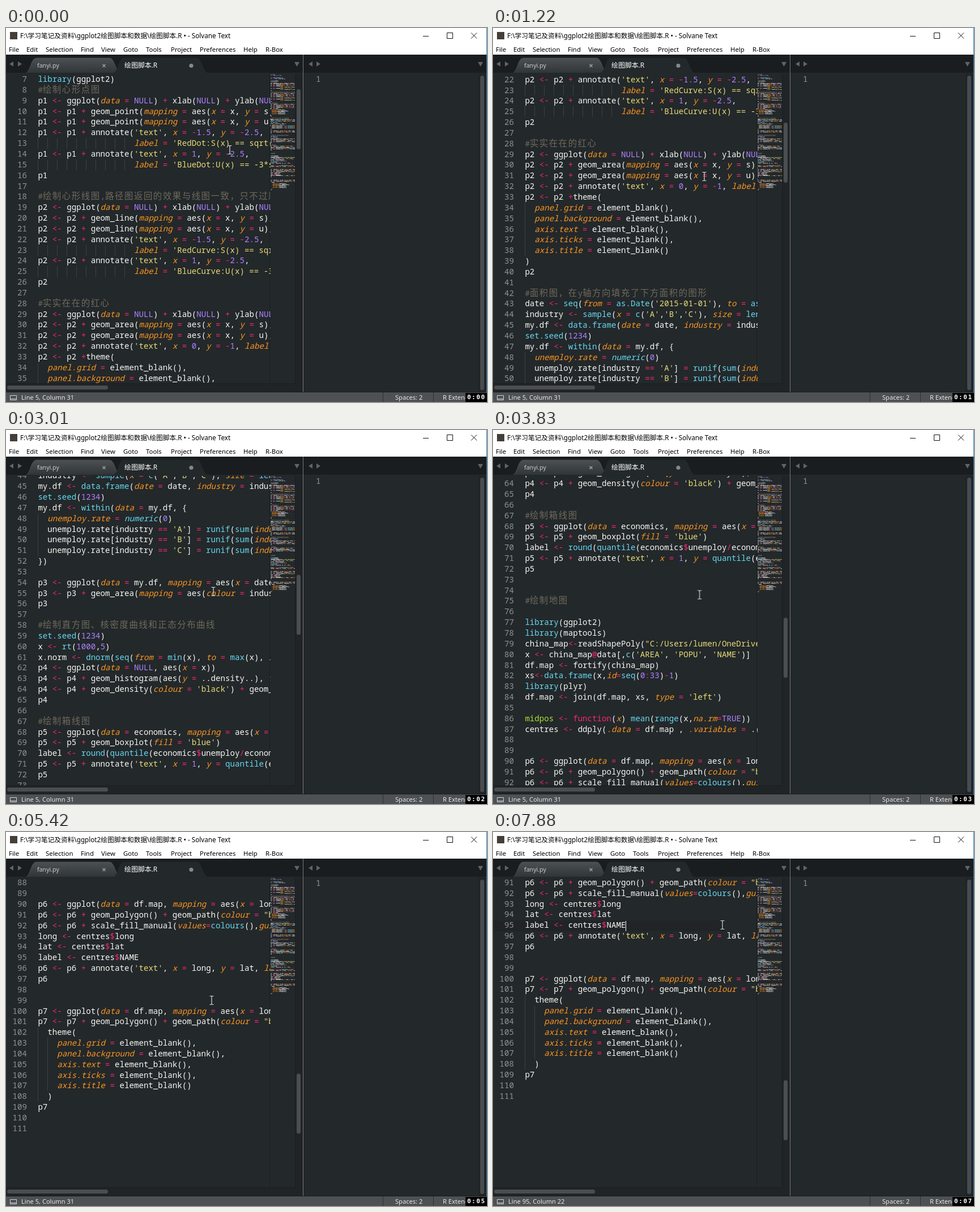
These frames come from a looping animation (849x660 px, 8000 ms). An HTML page:

```html
<!DOCTYPE html>
<html lang="zh">
<head>
<meta charset="utf-8">
<title>Editor</title>
<style>
@property --s { syntax: "<number>"; inherits: true; initial-value: 7; }
@property --t { syntax: "<integer>"; inherits: true; initial-value: 0; }

html, body { margin: 0; width: 849px; height: 660px; overflow: hidden; background: #23282b; }
body {
  position: relative;
  font: 11.4px "Noto Sans", "Noto Sans CJK SC", sans-serif;
  --row: 18.857px;
  animation: scroll 8s step-end infinite, tick 8s step-end infinite;
}
body > * { position: absolute; }
svg { left: 0; top: 0; overflow: visible; }

/* code */
#view { left: 0; top: 81px; width: 467px; height: 546px; overflow: hidden; }
#view .code { transform: translateY(calc((1 - var(--s)) * var(--row) + .6px)); }
.code, .num { font: 14.133px/18.857px "Noto Sans Mono", monospace; color: #f8f8f2; }
.row { position: relative; height: var(--row); padding-left: 56.4px; white-space: pre; }
.no { position: absolute; left: 0; width: 37px; text-align: right; }
.no, .num { color: #8f9391; }
.pad { background: repeating-linear-gradient(90deg, #3b4144 0 1px, transparent 1px 16.96px); display: inline-block; height: 100%; vertical-align: top; }
.com { color: #6e6a5b; }
.str { color: #e6db74; }
.arg { color: #fd971f; font-style: italic; }
.fun { color: #66d9ef; }
.typ { color: #66d9ef; font-style: italic; }
.def { color: #a6e22e; }
.op { color: #f92672; }
.val { color: #ae81ff; }
.cjk { font: 15.4px/1px "Noto Sans CJK SC", sans-serif; letter-spacing: 1.56px; }
#line { position: absolute; top: 75.4px; width: 408px; height: 19px; background: #202427; }
#caret { position: absolute; left: 234px; top: 76px; width: 1px; height: 18px; background: #f8f8f0; }
.num { left: 547px; top: 81px; }

/* minimap and scrollbar */
#map { left: 467px; top: 81px; width: 43px; height: 546px; overflow: hidden; }
#map .code { width: 430px; transform: scale(.1); transform-origin: 0 0; -webkit-text-stroke: 1.4px; }
#map .row { padding-left: 4px; }
#map .no { display: none; }
#thumb {
  left: 513px; top: 108px; width: 7px; height: 106px; border-radius: 4px; background: #4a4e50;
  transform: translateY(calc((var(--s) - 7) * 3.93px));
}

#clock { left: 811px; top: 644px; width: 38px; height: 16px; background: #000; color: #fff;
  font: bold 11px/16px "DejaVu Sans Mono", monospace; letter-spacing: 1.5px; text-indent: 3px; }
#clock::after { counter-reset: sec var(--t); content: "0:0" counter(sec); }

/* menu */
#hot { left: 451px; top: 28px; width: 44px; height: 18px; background: #cce8ff; border: 1px solid #99d1ff; }
#hot span { position: absolute; left: 6px; top: -1px; line-height: 20px; }
#menu {
  left: 451px; top: 47px; width: 245px; height: 315px; box-sizing: border-box; padding: 1.6px 0 0 33px;
  background: #f2f2f2; color: #6d6d6d; font-size: 11.6px; line-height: 20.7px; white-space: nowrap;
  box-shadow: 2px 2px 3px #0009;
}
#menu b { color: #000; font-weight: 400; }
#menu hr { margin: 2.65px 4px 2.65px -4px; border: 0; height: 1px; background: #d0d0d0; }

#mouse { animation: move 8s linear infinite; }

.show { opacity: 0; animation: 8s step-end infinite; }
#menu { animation-name: menu; }
#hot { animation-name: hot; }
#arrow { animation-name: arrow; }
#ring { animation-name: ring; }
.late { animation-name: late; }
.early { animation: early 8s step-end infinite; }
#beam { animation: beam 8s step-end infinite; }

@keyframes scroll {
  0% { --s: 7; }
  1.5% { --s: 7; animation-timing-function: steps(8, start); }
  15.2% { --s: 22; }
  17.12% { --s: 22; animation-timing-function: steps(4, start); }
  23.9% { --s: 31; }
  25.6% { --s: 31; animation-timing-function: steps(5, start); }
  33.7% { --s: 43; }
  37.6% { --s: 44.5; }
  38.85% { --s: 44.5; animation-timing-function: steps(7, start); }
  51.2% { --s: 67; }
  51.25% { --s: 68.5; }
  52.5% { --s: 70; }
  56% { --s: 73; }
  57.8% { --s: 76.36; }
  59.35% { --s: 76.36; animation-timing-function: steps(6, start); }
  69.4% { --s: 88; }
  69.5% { --s: 90; }
  71.2%, 100% { --s: 91; }
}
@keyframes tick {
  0% { --t: 0; }
  13.3% { --t: 1; }
  25.6% { --t: 2; }
  39% { --t: 3; }
  51.2% { --t: 4; }
  64.4% { --t: 5; }
  80% { --t: 6; }
  88.5%, 100% { --t: 7; }
}
@keyframes move {
  0%, 1.5% { transform: translate(395px, 215px); }
  15.2%, 17.1% { transform: translate(373px, 262px); }
  22.2%, 25.6% { transform: translate(370px, 272px); }
  37.6%, 38.8% { transform: translate(366px, 285px); }
  57.8%, 71.2% { transform: translate(363px, 297px); }
  77.5%, 85.2% { transform: translate(475px, 38px); }
  90.5% { transform: translate(374px, 185px); }
  96.6%, 100% { transform: translate(405px, 164px); }
}
@keyframes menu { 0% { opacity: 0; } 78.5% { opacity: .45; } 79.8% { opacity: 1; } 85.2%, 100% { opacity: 0; } }
@keyframes hot { 0% { opacity: 0; } 77.5% { opacity: 1; } 85.2%, 100% { opacity: 0; } }
@keyframes ring { 0% { opacity: 0; } 77.8% { opacity: 1; } 80.2%, 100% { opacity: 0; } }
@keyframes arrow { 0% { opacity: 0; } 77% { opacity: 1; } 85.6%, 100% { opacity: 0; } }
@keyframes beam { 0% { opacity: 1; } 77% { opacity: 0; } 85.6%, 100% { opacity: 1; } }
@keyframes late { 0% { opacity: 0; } 98.45%, 100% { opacity: 1; } }
@keyframes early { 0% { opacity: 1; } 98.45%, 100% { opacity: 0; } }
</style>
</head>
<body>
<svg width="849" height="660" viewBox="0 0 849 660">
  <defs>
    <linearGradient id="tab" x2="0" y2="1">
      <stop stop-color="#4c5052"/><stop offset="1" stop-color="#2f3437"/>
    </linearGradient>
  </defs>
  <rect width="849" height="47" fill="#fff"/>
  <rect x="7" y="7" width="13" height="13" fill="#443f3a"/>
  <text x="25" y="18" font-size="11.7">F:\学习笔记及资料\ggplot2绘图脚本和数据\绘图脚本.R • - Solvane Text</text>
  <path d="M736 14.5h10M778.5 8.5h10v10h-10zM821 8.5l10 10M831 8.5l-10 10" fill="none" stroke="#111"/>
  <g id="menus"></g>

  <rect y="47" width="849" height="33" fill="#1a1d1f"/>
  <path d="M34 80C44 78 43 53 54 53H182C193 53 192 78 204 80Z" fill="url(#tab)" stroke="#5d6163" stroke-width=".6"/>
  <path d="M188 80C199 78 198 52.5 208 52.5H336C347 52.5 346 78 358 80Z" fill="#23282b"/>
  <rect y="79" width="849" height="2" fill="#23282b"/>
  <text x="55" y="70" font-size="10.6" fill="#c9cbcc">fanyi.py</text>
  <path d="M170.5 64l5 5M175.5 64l-5 5" stroke="#a5a8a9" stroke-width="1.3"/>
  <text x="209" y="70" font-size="11.9" fill="#fff">绘图脚本.R</text>
  <circle cx="327" cy="66.5" r="3.6" fill="#85898b"/>
  <path d="M13 59v9l-7-4.5zM21 59v9l7-4.5zM509 60h9l-4.5 8zM541 59v9l-7-4.5zM548 59v9l7-4.5zM833 60h9l-4.5 8z" fill="#606466"/>

  <path d="M465.5 81V627M510.5 81V627M0 627.5H511" stroke="#1a1e20"/>
  <rect x="511" y="81" width="13" height="561" fill="#202427"/>
  <rect y="628" width="524" height="14" fill="#202427"/>
  <rect x="2" y="631" width="178" height="7" rx="3.5" fill="#4a4e50"/>
  <path d="M524.5 47V642" stroke="#75797b"/>
  <rect x="834" y="81" width="15" height="561" fill="#202427"/>
  <rect x="837" y="84" width="7" height="555" rx="3.5" fill="#484c4f"/>

  <rect y="643" width="849" height="17" fill="#4e5153"/>
  <path d="M0 642.5H849" stroke="#1a1d1f"/>
  <path d="M665.5 643V660M754.5 643V660" stroke="#2f3234"/>
  <path d="M7.5 648.5h11v8h-11zM8 654.5h10" fill="none" stroke="#d0d2d3"/>
  <g font-size="11.1" fill="#e6e7e8">
    <text class="early" x="27" y="656">Line 5, Column 31</text>
    <text class="show late" x="27" y="656">Line 95, Column 22</text>
    <text x="687" y="656">Spaces: 2</text>
    <text x="771" y="656">R Extended</text>
  </g>
  <path d="M848.5 0V644" stroke="#2a7fc4"/>
</svg>

<div id="view"><div id="line" class="show late"></div><div class="code"></div><div id="caret" class="show late"></div></div>
<div id="map"><div class="code"></div></div>
<div id="thumb"></div>
<div class="num">1</div>
<div id="clock"></div>
<div id="hot" class="show"><span>R-Box</span></div>
<div id="menu" class="show"></div>
<svg id="mouse" width="20" height="20">
  <path id="beam" d="M-3.5-7.5h2.5l1 1 1-1h2.5M-3.5 7.5h2.5l1-1 1 1h2.5M0-6.5v13" fill="none" stroke="#d9dbdc" stroke-width="1.2"/>
  <circle id="ring" class="show" r="9" fill="none" stroke="#222" stroke-width="1.3"/>
  <path id="arrow" class="show" d="M-1-1V13l3.2-3 2.2 5 2.2-1-2.2-4.8H9z" fill="#fff" stroke="#000" stroke-width=".9"/>
</svg>

<script>
const source = `#心形函数
x <- seq(-2, 2, 0.001)

s <- sqrt(1-(abs(x)-1)^2)
u <- -3*sqrt(1-sqrt(abs(x)/2))

library(ggplot2)
#绘制心形点图
p1 <- ggplot(data = NULL) + xlab(NULL) + ylab(NULL)
p1 <- p1 + geom_point(mapping = aes(x = x, y = s), colour = 'red')
p1 <- p1 + geom_point(mapping = aes(x = x, y = u), colour = 'blue')
p1 <- p1 + annotate('text', x = -1.5, y = -2.5,
                    label = 'RedDot:S(x) == sqrt(1-(abs(x)-1)^2)')
p1 <- p1 + annotate('text', x = 1, y = -2.5,
                    label = 'BlueDot:U(x) == -3*sqrt(1-sqrt(x))')
p1

#绘制心形线图,路径图返回的效果与线图一致，只不过顺序不同
p2 <- ggplot(data = NULL) + xlab(NULL) + ylab(NULL)
p2 <- p2 + geom_line(mapping = aes(x = x, y = s), colour = 'red')
p2 <- p2 + geom_line(mapping = aes(x = x, y = u), colour = 'blue')
p2 <- p2 + annotate('text', x = -1.5, y = -2.5,
                    label = 'RedCurve:S(x) == sqrt(1-(abs(x)-1)^2)')
p2 <- p2 + annotate('text', x = 1, y = -2.5,
                    label = 'BlueCurve:U(x) == -3*sqrt(1-sqrt(x))')
p2

#实实在在的红心
p2 <- ggplot(data = NULL) + xlab(NULL) + ylab(NULL)
p2 <- p2 + geom_area(mapping = aes(x = x, y = s), fill = 'red')
p2 <- p2 + geom_area(mapping = aes(x = x, y = u), fill = 'red')
p2 <- p2 + annotate('text', x = 0, y = -1, label = 'LOVE')
p2 <- p2 +theme(
  panel.grid = element_blank(),
  panel.background = element_blank(),
  axis.text = element_blank(),
  axis.ticks = element_blank(),
  axis.title = element_blank()
)
p2

#面积图，在y轴方向填充了下方面积的图形
date <- seq(from = as.Date('2015-01-01'), to = as.Date('2015-12-31'))
industry <- sample(x = c('A','B','C'), size = length(date))
my.df <- data.frame(date = date, industry = industry)
set.seed(1234)
my.df <- within(data = my.df, {
  unemploy.rate = numeric(0)
  unemploy.rate[industry == 'A'] = runif(sum(industry == 'A'))
  unemploy.rate[industry == 'B'] = runif(sum(industry == 'B'))
  unemploy.rate[industry == 'C'] = runif(sum(industry == 'C'))
})

p3 <- ggplot(data = my.df, mapping = aes(x = date, y = unemploy.rate))
p3 <- p3 + geom_area(mapping = aes(colour = industry, fill = industry))
p3

#绘制直方图、核密度曲线和正态分布曲线
set.seed(1234)
x <- rt(1000,5)
x.norm <- dnorm(seq(from = min(x), to = max(x), length.out = 1000))
p4 <- ggplot(data = NULL, aes(x = x))
p4 <- p4 + geom_histogram(aes(y = ..density..), fill = 'blue')
p4 <- p4 + geom_density(colour = 'black') + geom_line(aes(y = x.norm))
p4

#绘制箱线图
p5 <- ggplot(data = economics, mapping = aes(x = 1, y = unemploy))
p5 <- p5 + geom_boxplot(fill = 'blue')
label <- round(quantile(economics$unemploy/economics$pop),3)
p5 <- p5 + annotate('text', x = 1, y = quantile(economics$unemploy))
p5


#绘制地图

library(ggplot2)
library(maptools)
china_map<-readShapePoly("C:/Users/lumen/OneDrive/map/bou2_4p.shp")
x <- china_map@data[,c('AREA', 'POPU', 'NAME')]
df.map <- fortify(china_map)
xs<-data.frame(x,id=seq(0:33)-1)
library(plyr)
df.map <- join(df.map, xs, type = 'left')

midpos <- function(x) mean(range(x,na.rm=TRUE))
centres <- ddply(.data = df.map , .variables = .(NAME), long = midpos)


p6 <- ggplot(data = df.map, mapping = aes(x = long, y = lat))
p6 <- p6 + geom_polygon() + geom_path(colour = "black")
p6 <- p6 + scale_fill_manual(values=colours(),guide = 'none')
long <- centres$long
lat <- centres$lat
label <- centres$NAME
p6 <- p6 + annotate('text', x = long, y = lat, label = label)
p6


p7 <- ggplot(data = df.map, mapping = aes(x = long, y = lat))
p7 <- p7 + geom_polygon() + geom_path(colour = "black") +
  theme(
    panel.grid = element_blank(),
    panel.background = element_blank(),
    axis.text = element_blank(),
    axis.ticks = element_blank(),
    axis.title = element_blank()
  )
p7

`;

const token = new RegExp([
  /(?<com>#.*)/,
  /(?<str>'[^']*'|"[^"]*")/,
  /(?<arg>(?<=(?:[(,]|^ ) *)[.a-z][\w.]*(?= *=)|(?<=function\()x)/,
  /(?<def>midpos(?= <))/,
  /(?<typ>numeric(?=\())/,
  /(?<fun>\b(?:library|seq|as\.Date|sample|c|length|data\.frame|set\.seed|within|runif|sum|rt|dnorm|min|max|round|quantile|colours|mean|range|sqrt|abs)(?=\())/,
  /(?<op>function\b|[-+*\/<>=$@:^]+)/,
  /(?<val>\b(?:NULL|TRUE|\d[\d.]*)\b)/,
  /(?<id>[\w.]+)/
].map(r => r.source).join('|'), 'g');

const span = (cls, text) => `<span class="${cls}">${text}</span>`;

function paint(line) {
  const indent = line.match(/^ */)[0];
  const html = line.replace(token, (...m) => {
    const kind = Object.entries(m.at(-1)).find(e => e[1])[0];
    return span(kind, m[0].replace(/</g, '&lt;'));
  }).slice(indent.length);
  return (indent && span('pad', indent)) + html.replace(/[^\x00-\xff]+/g, s => span('cjk', s));
}

const rows = source.split('\n')
  .map((line, i) => `<div class="row">${span('no', i + 1)}${paint(line)}</div>`).join('');
document.querySelectorAll('.code').forEach(el => el.innerHTML = rows);

const menus = { File: 5, Edit: 36, Selection: 70, Find: 132, View: 168, Goto: 207, Tools: 247,
  Project: 291, Preferences: 342, Help: 419, 'R-Box': 458 };
document.getElementById('menus').innerHTML = Object.entries(menus)
  .map(([name, x]) => `<text x="${x}" y="42">${name}</text>`).join('');

const groups = [
  ['Send Current Line/Selection', 'Source Current File', 'Set Working Directory', '<b>Clear Workspace</b>'],
  ['Build and Reload Package', 'Clean and Build Package', 'Devtools: Load All'],
  ['Devtools: Check Package', 'Devtools: Test Package', 'Devtools: Document Package', 'Rcpp: Compile Attributes'],
  ['Rmarkdown: Render', 'Rnw: Sweave + PdfLaTeX', 'Rnw: Kintr + PdfLaTeX']
];
document.getElementById('menu').innerHTML = groups
  .map(g => g.map(item => `<div>${item}</div>`).join('')).join('<hr>');
</script>
</body>
</html>
```
